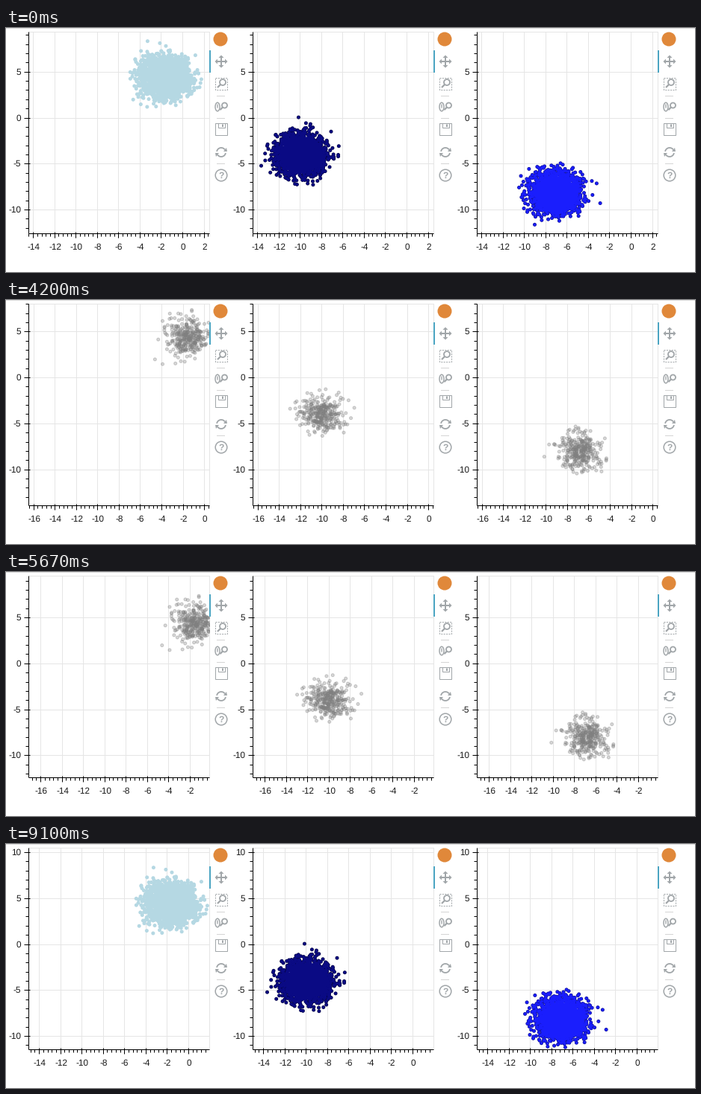
Write a matplotlib script that moves like this. It is 922x328 px and loops after 9.17 s.

```python
import numpy as np
import matplotlib.pyplot as plt
from matplotlib.animation import FuncAnimation
from matplotlib.collections import LineCollection
from matplotlib.patches import Circle, Ellipse, Polygon, Rectangle, Arc

plt.rcParams["path.snap"] = False
plt.rcParams["text.hinting"] = "none"

W, H, DPI = 922, 328, 72          # at 72 dpi one point equals one pixel
STEP, FRAMES = 70, 131
LEFT, RIGHT, TOP, BOTTOM = 30.5, 272.5, 5.5, 276.5
SHIFTS = (0, 300, 600)
UNIT_X, UNIT_Y = 14.28, 12.35     # pixels per data unit
GRID, ICON = "#e5e5e5", "#a1a6a9"
FILLS = ("#b5d8e3", "#0a0a84", "#1a1efd")
RIMS = ("#b5d8e3", "#030344", "#0e0e98")
DRAG_START, DRAG_END = 2590, 7070

# Pan path: time, then the pixel position of the data origin.
PAN = np.array([
    (2590, 236.5, 121), (2940, 250, 121), (3500, 258, 121),
    (3570, 258, 120), (3710, 259, 120), (3850, 259, 120),
    (4690, 275, 83), (5320, 285.7, 110), (5740, 273, 126),
    (5950, 262, 131), (6020, 262, 131), (6300, 249, 132.5),
    (6570, 244.5, 135),
])


def make_blobs(total=10000, groups=3):
    """Shuffled Gaussian clusters, each with its centre."""
    rng = np.random.RandomState(1)
    centers = rng.uniform(-10, 10, (groups, 2))
    sizes = [total // groups + (i < total % groups) for i in range(groups)]
    points = np.concatenate([rng.normal(c, 1.0, (n, 2))
                             for c, n in zip(centers, sizes)])
    labels = np.repeat(np.arange(groups), sizes)
    order = np.arange(total)
    rng.shuffle(order)
    points, labels = points[order], labels[order]
    return [(centers[i], points[labels == i]) for i in range(groups)]


fig = plt.figure(figsize=(W / DPI, H / DPI), dpi=DPI, facecolor="white")
ax = fig.add_axes([0, 0, 1, 1])
ax.set_xlim(0, W)
ax.set_ylim(H, 0)
ax.axis("off")


def line(xs, ys, color=ICON, lw=1.5, **kw):
    ax.plot(xs, ys, color=color, lw=lw, solid_capstyle="butt", **kw)


def shape(patch):
    ax.add_patch(patch)


def block(x, y, w, h, color=ICON, z=1):
    shape(Rectangle((x, y), w, h, fc=color, ec="none", zorder=z))


def frame_box(x, y, w, h, **kw):
    shape(Rectangle((x, y), w, h, fc="none", ec=ICON, lw=1, **kw))


def ring(x, y, r, lw=1.6):
    shape(Circle((x, y), r, fc="none", ec=ICON, lw=lw))


def triangle(points):
    shape(Polygon(points, closed=True, fc=ICON, ec="none"))


def pan_icon(x, y):
    line([x - 6, x + 6], [y, y], lw=2)
    line([x, x], [y - 6, y + 6], lw=2)
    for dx, dy in ((1, 0), (-1, 0), (0, 1), (0, -1)):
        triangle([(x + 8.5 * dx, y + 8.5 * dy),
                  (x + 5 * dx + 3.5 * dy, y + 5 * dy + 3.5 * dx),
                  (x + 5 * dx - 3.5 * dy, y + 5 * dy - 3.5 * dx)])


def lens(x, y, r, tail):
    ring(x, y, r, 1.8)
    d = r * 0.75
    line([x - d, x - d - tail], [y + d, y + d + tail], lw=2.2)


def box_zoom_icon(x, y):
    frame_box(x - 7.5, y - 7.5, 16, 16, ls=(0, (2, 1.4)))
    lens(x + 2, y - 2, 4, 4)


def wheel_zoom_icon(x, y):
    shape(Ellipse((x - 5, y), 6, 11.5, fc="none", ec=ICON, lw=1.5))
    line([x - 5, x - 5], [y - 3.5, y + 1.5], lw=1.4)
    lens(x + 4.5, y - 2, 3.5, 3.5)


def save_icon(x, y):
    frame_box(x - 7.5, y - 7.5, 16, 16)
    frame_box(x - 3.5, y - 7.5, 9, 6)
    block(x + 1, y - 6.5, 2, 3.5)


def reset_icon(x, y):
    for start in (10, 190):
        shape(Arc((x, y), 12, 12, theta1=start, theta2=start + 135,
                  ec=ICON, lw=1.8))
    for s in (1, -1):
        triangle([(x + 3 * s, y - s), (x + 8 * s, y - s),
                  (x + 7 * s, y - 6 * s)])


def help_icon(x, y):
    ring(x, y, 7.8, 1.5)
    ax.text(x, y + 4.3, "?", color=ICON, fontsize=12, ha="center",
            va="baseline", family="Liberation Sans", weight="bold")


def toolbar(dx):
    x = 288 + dx
    shape(Circle((x - 1, 15), 9.5, fc="#e0883a", ec="none"))
    block(272 + dx, 30, 2, 30, "#4ba5c2", z=6)
    pan_icon(x, 45)
    box_zoom_icon(x, 75)
    wheel_zoom_icon(x, 106)
    save_icon(x, 136)
    reset_icon(x, 167)
    help_icon(x, 198)
    for y in (91, 121, 182):
        line([x - 6, x + 5], [y + 0.5] * 2, "#d4d4d4", 1)


def segments(color, z):
    coll = LineCollection([], colors=color, linewidths=1, zorder=z)
    ax.add_collection(coll, autolim=False)
    return coll


class Dots:
    """Data points drawn as circles clipped to one plot."""

    def __init__(self, dx, points, size, z, subpixel=True, **style):
        self.dx, self.points = dx, points
        self.coll = ax.scatter([], [], s=size, zorder=z, **style)
        if subpixel:  # one size per dot avoids rounding to whole pixels
            self.coll.set_sizes(np.full(len(points), size))
        self.coll.set_clip_path(Rectangle(
            (LEFT + dx, TOP), RIGHT - LEFT, BOTTOM - TOP,
            transform=ax.transData))

    def place(self, x0, y0, shown):
        self.coll.set_visible(shown)
        if shown:
            self.coll.set_offsets(np.column_stack(
                (x0 + self.dx + self.points[:, 0] * UNIT_X,
                 y0 - self.points[:, 1] * UNIT_Y)))


class Panel:
    def __init__(self, dx, blob, fill, rim):
        self.dx = dx
        center, points = blob
        outer = np.hypot(*(points - center).T) > 2
        edge = points[outer]
        self.full = [
            Dots(dx, edge, 5.0 ** 2, 3, c=rim, linewidths=0),
            Dots(dx, edge, 3.6 ** 2, 4, c=fill, linewidths=0),
            Dots(dx, points[~outer], 4 ** 2, 4, subpixel=False, c=fill,
                 linewidths=0)]
        self.sparse = Dots(dx, points[::10], 4 ** 2, 4, linewidths=1,
                           facecolors=(.5, .5, .5, .3),
                           edgecolors=(.5, .5, .5, .38))
        self.grid = segments(GRID, 1)
        self.ticks = segments("black", 5)
        style = dict(fontsize=11.7, color="#1a1a1a", va="baseline",
                     family="Liberation Sans")
        self.xlabels = [ax.text(0, 298, "", ha="center", **style)
                        for _ in range(10)]
        self.ylabels = [ax.text(dx + 20, 0, "", ha="right", **style)
                        for _ in range(6)]
        line([LEFT + dx, RIGHT + dx, RIGHT + dx], [TOP, TOP, BOTTOM],
             GRID, 1, zorder=2)
        line([LEFT + dx] * 2, [TOP, BOTTOM], "black", 1, zorder=5)
        line([LEFT + dx, RIGHT + dx], [BOTTOM] * 2, "black", 1, zorder=5)
        toolbar(dx)

    def update(self, x0, y0, dragging):
        for dots in self.full:
            dots.place(x0, y0, not dragging)
        self.sparse.place(x0, y0, dragging)
        self.place_axes(x0, y0)

    def place_axes(self, x0, y0):
        dx = self.dx
        xs = visible(np.arange(-24, 12, 2), x0, UNIT_X, LEFT, RIGHT)
        ys = visible(np.arange(-30, 30, 5), y0, -UNIT_Y, TOP, BOTTOM)
        fine_x = visible(np.arange(-24, 12, 0.4), x0, UNIT_X, LEFT, RIGHT)
        fine_y = visible(np.arange(-30, 30, 1), y0, -UNIT_Y, TOP, BOTTOM)
        self.grid.set_segments(
            [[(p + dx, TOP), (p + dx, BOTTOM)] for _, p in xs]
            + [[(LEFT + dx, p), (RIGHT + dx, p)] for _, p in ys])
        self.ticks.set_segments(
            [[(p + dx, BOTTOM - 2), (p + dx, BOTTOM + 6)] for _, p in xs]
            + [[(p + dx, BOTTOM), (p + dx, BOTTOM + 4)] for _, p in fine_x]
            + [[(LEFT + dx - 6, p), (LEFT + dx + 2, p)] for _, p in ys]
            + [[(LEFT + dx - 4, p), (LEFT + dx, p)] for _, p in fine_y])
        for label in self.xlabels + self.ylabels:
            label.set_text("")
        for label, (value, p) in zip(self.xlabels, xs):
            label.set_text(f"{value:d}")
            label.set_x(p + dx)
        for label, (value, p) in zip(self.ylabels, ys):
            label.set_text(f"{value:d}")
            label.set_y(p + 3.5)


def visible(values, origin, unit, low, high):
    """Values inside the plot, each with the centre of its pixel."""
    pairs = [(v, origin + v * unit) for v in values]
    return [(v, np.floor(p) + 0.5) for v, p in pairs if low <= p <= high]


panels = [Panel(*args) for args in zip(SHIFTS, make_blobs(), FILLS, RIMS)]
line([0, W], [0.5, 0.5], "#dedede", 1)


def draw(frame):
    t = frame * STEP
    x0 = np.interp(t, PAN[:, 0], PAN[:, 1])
    y0 = np.interp(t, PAN[:, 0], PAN[:, 2])
    for panel in panels:
        panel.update(x0, y0, DRAG_START <= t < DRAG_END)
    return []


anim = FuncAnimation(fig, draw, frames=FRAMES, interval=STEP, repeat=True,
                     init_func=lambda: [], blit=False)
plt.show()
```
